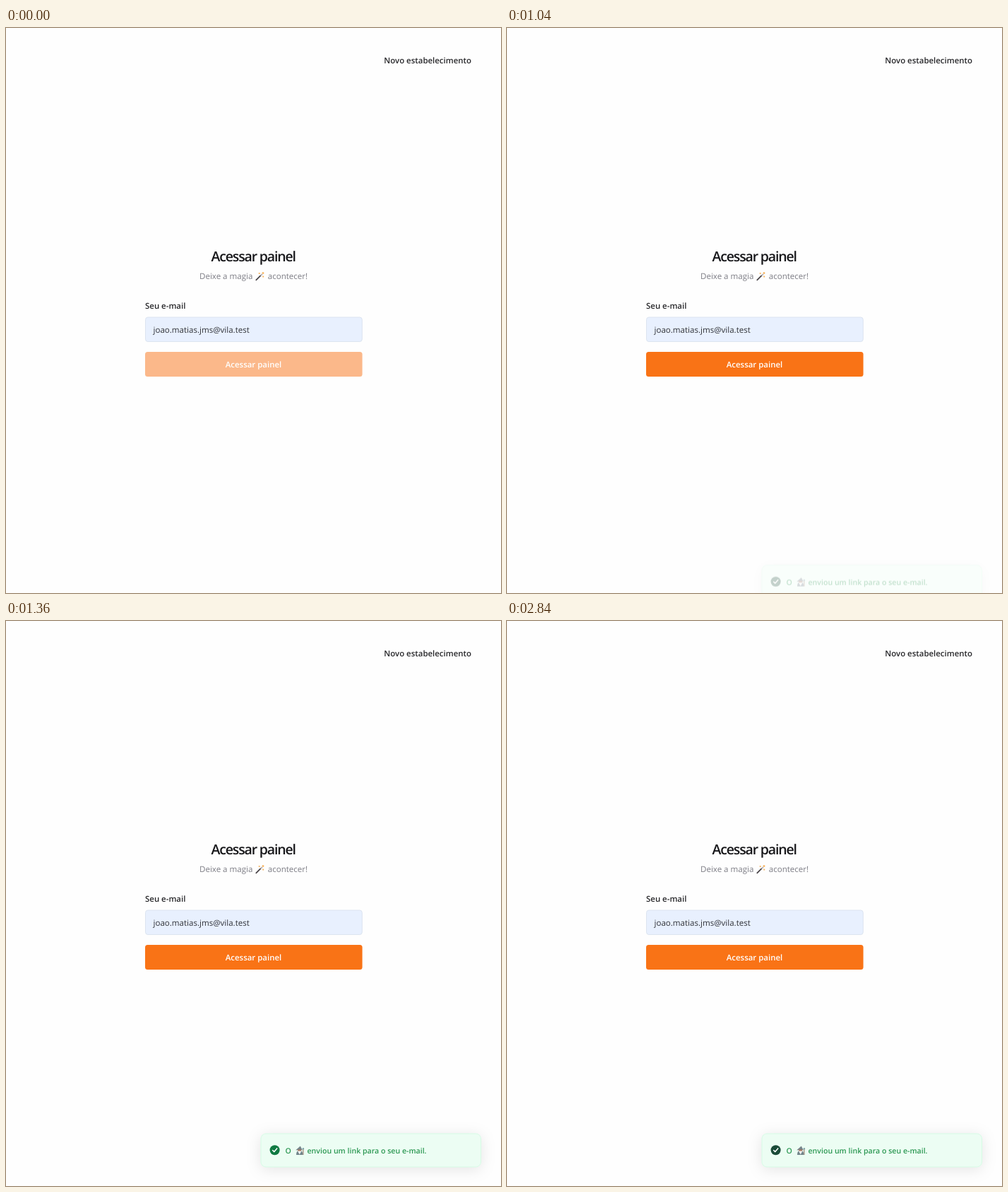
An HTML page that plays this animation: 701 by 799 pixels, repeating every 3.16 s.

```html
<!DOCTYPE html>
<html lang="pt-BR">
<head>
<meta charset="utf-8">
<title>Acessar painel</title>
<style>
  html, body { margin: 0; width: 100%; height: 100%; overflow: hidden; background: #fefefe; }
  svg { display: block; width: 701px; height: 799px; }
  text {
    font: 600 11.45px "Open Sans", "Noto Sans", sans-serif;
    fill: #27272a;
    text-rendering: geometricPrecision;
  }
  .title { font-size: 19.5px; letter-spacing: -1.15px; fill: #18181b; }
  .muted { font-weight: 400; font-size: 11.55px; fill: #7c7c84; }
  .value { font-weight: 400; font-size: 11.55px; fill: #303238; }
  .center { text-anchor: middle; }
  .end { text-anchor: end; }

  .button, .toast, .badge { animation: 3160ms infinite both; }
  .button { animation-name: enable; animation-timing-function: step-end; }
  .button text { fill: #fff; }
  .toast { animation-name: rise; animation-timing-function: linear; }
  .toast text { font-size: 10.6px; fill: #2c9853; }
  .card {
    fill: #ecfdf3;
    stroke: #d6fbe5;
    filter: drop-shadow(0 3.5px 10px rgba(0, 0, 0, .1));
  }
  .badge { animation-name: tint; animation-timing-function: step-end; }

  @keyframes enable {
    0% { opacity: .5; }
    30.38%, 100% { opacity: 1; }
  }
  @keyframes rise {
    0% { opacity: 0; transform: translateY(48px); }
    30.54% { opacity: 0; transform: translateY(48px); animation-timing-function: ease; }
    43.04%, 100% { opacity: 1; transform: none; }
  }
  @keyframes tint {
    0% { fill: #2a5c45; }
    43.04% { fill: #0f7a42; }
    59.49% { fill: #14392b; }
    83.54%, 100% { fill: #1a4b38; }
  }
</style>
</head>
<body>
<svg viewBox="0 0 701 799">
  <text class="end" x="659" y="50">Novo estabelecimento</text>

  <text class="title center" x="350.2" y="330">Acessar painel</text>
  <text class="muted" x="274" y="355.3">Deixe a magia</text>
  <g class="wand">
    <path d="M354.3 356.3 362 348.6" stroke="#4a4549" stroke-width="1.8" stroke-linecap="round"/>
    <path d="M360.6 350 362.2 348.4" stroke="#d8d4d6" stroke-width="1.8"/>
    <g fill="#f6b25c">
      <circle cx="358.7" cy="347" r="1.1"/>
      <circle cx="364" cy="346.6" r="1.4"/>
      <circle cx="364.2" cy="351.6" r="1.1"/>
    </g>
  </g>
  <text class="muted" x="370.8" y="355.3">acontecer!</text>

  <text x="197" y="396.5">Seu e-mail</text>
  <rect x="197.5" y="409" width="306.8" height="34.5" rx="3.5" fill="#e8f0fe" stroke="#dce4f0"/>
  <text class="value" x="208.5" y="430.8">joao.matias.jms@vila.test</text>

  <g class="button">
    <rect x="197" y="458" width="307.6" height="35" rx="3.5" fill="#f97316"/>
    <text class="center" x="350.5" y="479.8">Acessar painel</text>
  </g>

  <g class="toast">
    <rect class="card" x="361" y="725" width="311.5" height="47" rx="7"/>
    <circle class="badge" cx="380.6" cy="748.2" r="7"/>
    <path d="M377.6 748.5 379.8 750.6 383.7 745.9" fill="none" stroke="#fff" stroke-width="1.5" stroke-linecap="round" stroke-linejoin="round"/>
    <text x="395.4" y="752.7">O</text>
    <g class="mage">
      <path d="M411 755Q411 748.5 415.7 748.5T420.4 755Z" fill="#71858a"/>
      <path d="M410.3 748.3 416.8 742.4 419.8 748.3Z" fill="#76848a"/>
      <rect x="413.3" y="747.4" width="4.8" height="2.6" fill="#a8775f"/>
      <path d="M412.9 749.4H418.5L415.7 754.6Z" fill="#f2f4f3"/>
      <path d="M420.9 747V755" stroke="#8a6a5a"/>
      <circle cx="420.9" cy="746.3" r="1.2" fill="#7fa3a8"/>
    </g>
    <text x="426.5" y="752.7">enviou um link para o seu e-mail.</text>
  </g>
</svg>
</body>
</html>
```
